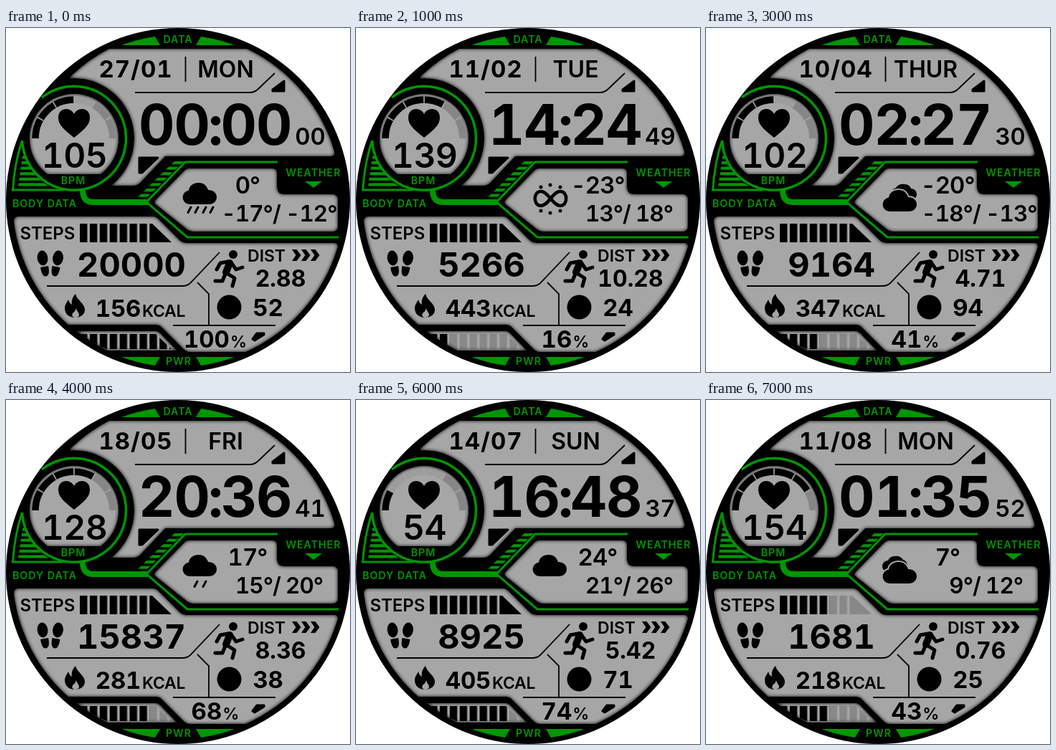
An HTML page without scripts that plays this animation: 480x480 px, repeating every 8 s.

```html
<!DOCTYPE html>
<html lang="en">
<head>
<meta charset="utf-8">
<title>Watch face</title>
<style>
  html, body { margin: 0; width: 100%; height: 100%; overflow: hidden; background: #fff; }
  svg { display: block; width: 100vw; height: 100vh; }
  text { font-family: Inter, "Open Sans", sans-serif; font-weight: 600; font-variant-numeric: tabular-nums; text-anchor: middle; }
  .label { font-size: 14.2px; letter-spacing: 1px; fill: #009600; }
  .digits text { font-weight: 700; }
  .start text { text-anchor: start; }
  .end text { text-anchor: end; }
  .unit { font-size: 23px; font-weight: 600; }
  .green { fill: none; stroke: #009600; }
  .thin { fill: none; stroke: #000; stroke-width: 1.8; }

  /* Each child of a .cycle is visible for one second of eight. */
  .cycle > * { animation: turn 8s step-end calc(var(--i) * 1s - 8s) infinite; }
  .cycle > :nth-child(1) { --i: 0; }
  .cycle > :nth-child(2) { --i: 1; }
  .cycle > :nth-child(3) { --i: 2; }
  .cycle > :nth-child(4) { --i: 3; }
  .cycle > :nth-child(5) { --i: 4; }
  .cycle > :nth-child(6) { --i: 5; }
  .cycle > :nth-child(7) { --i: 6; }
  .cycle > :nth-child(8) { --i: 7; }
  @keyframes turn { 0% { visibility: visible; } 12.5%, 100% { visibility: hidden; } }

  .pulse { animation: pulse 8s step-end infinite; }
  @keyframes pulse {
    0% { stroke-dasharray: 3 9; }
    12.5% { stroke-dasharray: 4 9; }
    37.5% { stroke-dasharray: 3 9; }
    50% { stroke-dasharray: 4 9; }
    62.5% { stroke-dasharray: 2 9; }
    75% { stroke-dasharray: 1 9; }
    87.5%, 100% { stroke-dasharray: 5 9; }
  }
  .steps { animation: steps 8s step-end infinite; }
  @keyframes steps { 0% { width: 130px; } 87.5%, 100% { width: 69.5px; } }
  .power { animation: power 8s step-end infinite; }
  @keyframes power {
    0% { width: 139px; }
    12.5% { width: 27.8px; }
    37.5% { width: 55.6px; }
    50% { width: 97.3px; }
    62.5% { width: 69.5px; }
    75% { width: 111.2px; }
    87.5%, 100% { width: 69.5px; }
  }
</style>
</head>
<body>
<svg viewBox="0 0 480 480">
  <defs>
    <filter id="inset" x="0" y="0" width="480" height="480" filterUnits="userSpaceOnUse" color-interpolation-filters="sRGB">
      <feComponentTransfer in="SourceAlpha"><feFuncA type="linear" slope="-1" intercept="1"/></feComponentTransfer>
      <feGaussianBlur stdDeviation="2.6"/>
      <feComposite in2="SourceAlpha" operator="in" result="shade"/>
      <feMerge><feMergeNode in="SourceGraphic"/><feMergeNode in="shade"/></feMerge>
    </filter>
    <mask id="aroundDial" maskUnits="userSpaceOnUse" x="0" y="0" width="480" height="480">
      <rect width="480" height="480" fill="#fff"/>
      <circle cx="95" cy="154" r="84"/>
    </mask>
    <pattern id="bars" patternUnits="userSpaceOnUse" x="103" width="13.9" height="480">
      <rect width="10.4" height="480" fill="#fff"/>
    </pattern>
    <pattern id="stripes" patternUnits="userSpaceOnUse" y="186" width="480" height="7.6">
      <rect width="480" height="4.2" fill="#009600"/>
    </pattern>
    <mask id="stepsShape" maskUnits="userSpaceOnUse" x="0" y="0" width="480" height="480">
      <path d="M103 273H200V299H103Z" fill="url(#bars)"/>
      <path d="M200.300 273H204L231 299H200.300Z" fill="#fff"/>
    </mask>
    <mask id="powerShape" maskUnits="userSpaceOnUse" x="0" y="0" width="480" height="480">
      <path d="M104 427H209L231 448H140Q120 440 104 427Z" fill="url(#bars)"/>
    </mask>
    <path id="cloud" d="M256 246a9.800 9.800 0 0 1-1-19.500C256 219 263 215.500 269 216c7 0 11 4 13 10 7 0 12 4 12 10s-5 10-11 10Z"/>
    <path id="drop" d="M3 0L-1 7.500" stroke="#000" stroke-width="3" stroke-linecap="round"/>
    <g id="showers">
      <use href="#cloud"/>
      <use href="#drop" x="264" y="253"/><use href="#drop" x="276" y="253"/>
    </g>
    <g id="rain">
      <use href="#cloud"/>
      <use href="#drop" x="255" y="250"/><use href="#drop" x="265" y="250"/>
      <use href="#drop" x="276" y="250"/><use href="#drop" x="286" y="250"/>
    </g>
    <use id="frontCloud" href="#cloud" y="10" stroke="#a6a6a6" stroke-width="4" paint-order="stroke"/>
    <path id="backCloud" d="M264 238a8 8 0 0 1 1-15c2-4 7-6 12-5 5 0 8 3 9 6 5 0 8 4 8 8s-3 7-7 7Z"/>
    <g id="foot">
      <ellipse cx="51" cy="321" rx="7.400" ry="10.500" transform="rotate(-8 51 321)"/>
      <path d="M48 334L59 332Q62 346 55 346.500Q50 347 48 334Z"/>
    </g>
    <path id="gauge" d="M41 154A54 54 0 0 1 149 154" fill="none" stroke-width="9.500" pathLength="6"/>
    <path id="wing" d="M161 24A230 230 0 0 1 208 12L215 24Z" fill="#009600"/>
    <path id="chevron" d="M399 309h6.500l6 8-6 8H399l5.500-8Z"/>
  </defs>

  <circle cx="240" cy="240" r="240"/>

  <!-- panels -->
  <g fill="#a6a6a6" filter="url(#inset)">
    <path mask="url(#aroundDial)" d="M92 66A232 232 0 0 1 144 29H336A232 232 0 0 1 458 172Q460 179 452 179H222L188 215Q184 220 176 220H110V72H96Q86 72 92 66Z"/>
    <path d="M58.300 204A62 62 0 1 1 131.700 204Z"/>
    <path d="M209 240L249 199Q252 196 257 196H371Q378 196 378 203V222Q378 232 388 232H455Q463 232 463 240V276Q463 284 455 284H262Q257 284 253 281L209 246Q206 243 209 240Z"/>
    <path d="M18 263H205Q209 263 212 266L242 296Q246 300 252 300H457Q465 300 462 308A232 232 0 0 1 334 452H258Q252 452 248 448L218 418Q215 414 209 414H87A232 232 0 0 1 11 270Q11 263 18 263Z"/>
    <path d="M99 423H208Q212 423 215 426L238 450H142A232 232 0 0 1 99 423Z"/>
  </g>

  <!-- green trim -->
  <use href="#wing"/>
  <use href="#wing" transform="matrix(-1 0 0 1 480 0)"/>
  <use href="#wing" transform="matrix(1 0 0 -1 0 483)"/>
  <use href="#wing" transform="matrix(-1 0 0 -1 480 483)"/>
  <path d="M24 172L17 221H60Q34 204 24 172Z" fill="url(#stripes)"/>
  <path class="green" stroke-width="3" d="M22.500 157Q12 188 9.500 226H80"/>
  <path class="green" stroke-width="3.500" d="M50 97A72.500 72.500 0 1 1 22.600 157"/>
  <path class="green" stroke-width="8" d="M107 226Q107 243 122 243H198"/>
  <path class="green" stroke-width="3" d="M379 187H250L196 243L253 292H464"/>
  <path d="M235 186H248L194 239H181Z" fill="url(#stripes)"/>
  <path d="M417 214H441L429 223Z" fill="#009600"/>
  <text class="label" x="240" y="21">DATA</text>
  <text class="label" x="241" y="470">PWR</text>
  <text class="label" x="94" y="218">BPM</text>
  <text class="label" x="54" y="250">BODY DATA</text>
  <text class="label" x="429" y="207">WEATHER</text>

  <!-- rules and wedges -->
  <g class="thin">
    <path d="M250.500 40V75"/>
    <path d="M180 90H340Q347 90 352 85L375 63"/>
    <path d="M57 360H246Q253 360 257 356L298 313"/>
    <path d="M267 355L283 371V415M233 415H376"/>
  </g>
  <g stroke="#000" stroke-width="3" stroke-linejoin="round">
    <path d="M388 74V88H372V86Z"/>
    <path d="M186 181H212L190 202H186Z"/>
    <path d="M350 426H360V428L347 436L344 434Z"/>
  </g>

  <!-- date and time -->
  <g class="cycle digits" transform="translate(181 69)" font-size="33" letter-spacing="1">
    <text>27/01</text><text>11/02</text><text>26/03</text><text>10/04</text><text>18/05</text><text>21/06</text><text>14/07</text><text>11/08</text>
  </g>
  <g class="cycle" transform="translate(306.500 69)" font-size="32">
    <text>MON</text><text>TUE</text><text>WED</text><text>THUR</text><text>FRI</text><text>SAT</text><text>SUN</text><text>MON</text>
  </g>
  <g class="digits" font-size="78" letter-spacing="-1">
    <g class="cycle" transform="translate(234.500 163)">
      <text>00</text><text>14</text><text>04</text><text>02</text><text>20</text><text>21</text><text>16</text><text>01</text>
    </g>
    <text x="292" y="163">:</text>
    <g class="cycle" transform="translate(349 163)">
      <text>00</text><text>24</text><text>13</text><text>27</text><text>36</text><text>02</text><text>48</text><text>35</text>
    </g>
  </g>
  <g class="cycle" transform="translate(424.500 163)" font-size="33">
    <text>00</text><text>49</text><text>53</text><text>30</text><text>41</text><text>52</text><text>37</text><text>52</text>
  </g>

  <!-- heart rate -->
  <use href="#gauge" stroke="#9d9d9d"/>
  <use href="#gauge" stroke="#868686" stroke-dasharray="0 4 2"/>
  <path class="pulse" d="M41 154A54 54 0 0 1 149 154" fill="none" stroke="#000" stroke-width="9.500" pathLength="6"/>
  <use href="#gauge" stroke="#a6a6a6" stroke-width="10" stroke-dasharray="0 .97 .06 .94 .06 .94 .06 .94 .06 .94 .06 9"/>
  <path d="M95 153C80 141 73 135 73 125C73 117 78 113 84 113C89 113 93 116 95 120C97 116 101 113 106 113C112 113 117 117 117 125C117 135 110 141 95 153Z"/>
  <g class="cycle" transform="translate(95.500 195)" font-size="48" letter-spacing="-.5">
    <text>105</text><text>139</text><text>132</text><text>102</text><text>128</text><text>75</text><text>54</text><text>154</text>
  </g>

  <!-- weather -->
  <g class="cycle">
    <use href="#rain"/>
    <g>
      <path d="M271.500 238C264 229 261 228 258 228C247 228 247 248 258 248C269 248 274 228 285 228C296 228 296 248 285 248C282 248 279 247 271.500 238Z" fill="none" stroke="#000" stroke-width="4.500"/>
      <path d="M258 222h0m13-3h0m14 3h0M258 255h0m13 3h0m14-3h0" stroke="#000" stroke-width="5" stroke-linecap="round"/>
    </g>
    <g>
      <use href="#cloud"/><use href="#drop" x="264" y="252"/>
      <path d="M279 250v11m-5-8l10 5m0-5l-10 5" stroke="#000" stroke-width="2.200"/>
    </g>
    <g><use href="#backCloud"/><use href="#frontCloud"/></g>
    <use href="#showers"/>
    <use href="#showers"/>
    <use href="#cloud"/>
    <g><use href="#backCloud" transform="matrix(-1 0 0 1 540 0)"/><use href="#frontCloud"/></g>
  </g>
  <g letter-spacing="-1">
    <g class="cycle" transform="translate(337 231)" font-size="33">
      <text>0°</text><text>-23°</text><text>35°</text><text>-20°</text><text>17°</text><text>1°</text><text>24°</text><text>7°</text>
    </g>
    <g class="cycle end" transform="translate(383 270)" font-size="31.500">
      <text>-17°/</text><text>13°/</text><text>-12°/</text><text>-18°/</text><text>15°/</text><text>12°/</text><text>21°/</text><text>9°/</text>
    </g>
    <g class="cycle start" transform="translate(390 270)" font-size="31.500">
      <text>-12°</text><text>18°</text><text>-5°</text><text>-13°</text><text>20°</text><text>17°</text><text>26°</text><text>12°</text>
    </g>
  </g>

  <!-- steps -->
  <text x="58" y="295" font-size="24">STEPS</text>
  <g mask="url(#stepsShape)">
    <rect x="103" y="273" width="130" height="26" opacity=".18"/>
    <rect class="steps" x="103" y="273" width="130" height="26"/>
  </g>
  <use href="#foot"/>
  <use href="#foot" transform="matrix(-1 0 0 1 123.500 0)"/>
  <g class="cycle digits" transform="translate(175 347)" font-size="47">
    <text>20000</text><text>5266</text><text>12408</text><text>9164</text><text>15837</text><text>13514</text><text>8925</text><text>1681</text>
  </g>

  <!-- energy -->
  <path d="M97 371C98 379 110 384 110 393C110 400 104 404 96 404C88 404 82 399 82 391C82 386 85 383 87 379C88 383 90 385 92 386C91 380 93 375 97 371Z"/>
  <path d="M98 391C99 396 102 397 102 400C102 403 99 404 96 404C91 403 92 399 94 397Q97 395 98 391Z" fill="#a6a6a6"/>
  <g class="cycle digits" transform="translate(187.500 403)" font-size="33" letter-spacing="-.3">
    <text>156<tspan class="unit" dx="2">KCAL</tspan></text>
    <text>443<tspan class="unit" dx="2">KCAL</tspan></text>
    <text>36<tspan class="unit" dx="2">KCAL</tspan></text>
    <text>347<tspan class="unit" dx="2">KCAL</tspan></text>
    <text>281<tspan class="unit" dx="2">KCAL</tspan></text>
    <text>322<tspan class="unit" dx="2">KCAL</tspan></text>
    <text>405<tspan class="unit" dx="2">KCAL</tspan></text>
    <text>218<tspan class="unit" dx="2">KCAL</tspan></text>
  </g>

  <!-- distance -->
  <circle cx="317" cy="316" r="6"/>
  <g fill="none" stroke="#000" stroke-width="5" stroke-linecap="round" stroke-linejoin="round">
    <path d="M312 328L307 341" stroke-width="10"/>
    <path d="M314 327L321 337L330 334M310 326L299 328L294 337M308 342L319 349L316 360M306 343L302 353L292 353"/>
  </g>
  <text x="363.500" y="326" font-size="23">DIST</text>
  <use href="#chevron"/><use href="#chevron" x="13"/><use href="#chevron" x="26"/>
  <g class="cycle digits" transform="translate(383 361)" font-size="32">
    <text>2.88</text><text>10.28</text><text>11.65</text><text>4.71</text><text>8.36</text><text>7.80</text><text>5.42</text><text>0.76</text>
  </g>

  <!-- activity score -->
  <circle cx="311.500" cy="389.500" r="17"/>
  <g class="cycle digits" transform="translate(365.500 402)" font-size="33">
    <text>52</text><text>24</text><text>66</text><text>94</text><text>38</text><text>89</text><text>71</text><text>25</text>
  </g>

  <!-- battery -->
  <g mask="url(#powerShape)">
    <rect x="103" y="427" width="130" height="21" opacity=".18"/>
    <rect class="power" x="103" y="427" width="139" height="21"/>
  </g>
  <g class="cycle digits" transform="translate(292 446)" font-size="33">
    <text>100<tspan class="unit" dx="1">%</tspan></text>
    <text>16<tspan class="unit" dx="1">%</tspan></text>
    <text>15<tspan class="unit" dx="1">%</tspan></text>
    <text>41<tspan class="unit" dx="1">%</tspan></text>
    <text>68<tspan class="unit" dx="1">%</tspan></text>
    <text>46<tspan class="unit" dx="1">%</tspan></text>
    <text>74<tspan class="unit" dx="1">%</tspan></text>
    <text>43<tspan class="unit" dx="1">%</tspan></text>
  </g>
</svg>
</body>
</html>
```
